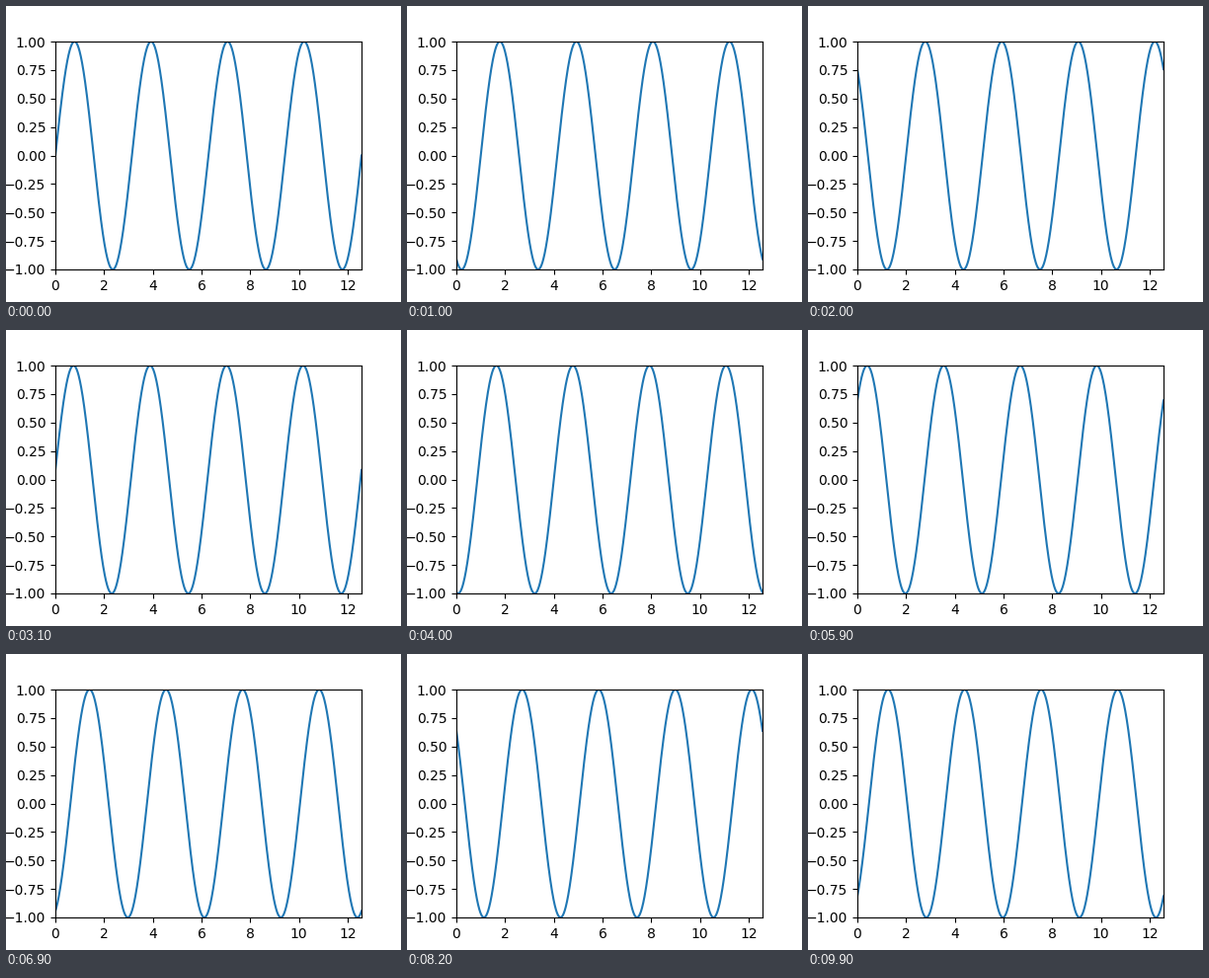
Write a matplotlib script that moves like this. It is 400 by 300 pixels and loops after 10 s.

```python
import numpy as np
import matplotlib.pyplot as plt
from matplotlib.animation import FuncAnimation

FRAMES = 100
INTERVAL = 100  # ms
SHIFT = 0.1     # wave travel per frame

fig, ax = plt.subplots(figsize=(4, 3), dpi=100)
x = np.linspace(0, 4 * np.pi, 1000)
ax.set_xlim(0, 4 * np.pi)
ax.set_ylim(-1, 1)
line, = ax.plot(x, np.sin(2 * x))


def update(i):
    line.set_ydata(np.sin(2 * (x - SHIFT * i)))
    return line,


anim = FuncAnimation(fig, update, frames=FRAMES, interval=INTERVAL,
                     repeat=True, repeat_delay=0)
plt.show()
```
